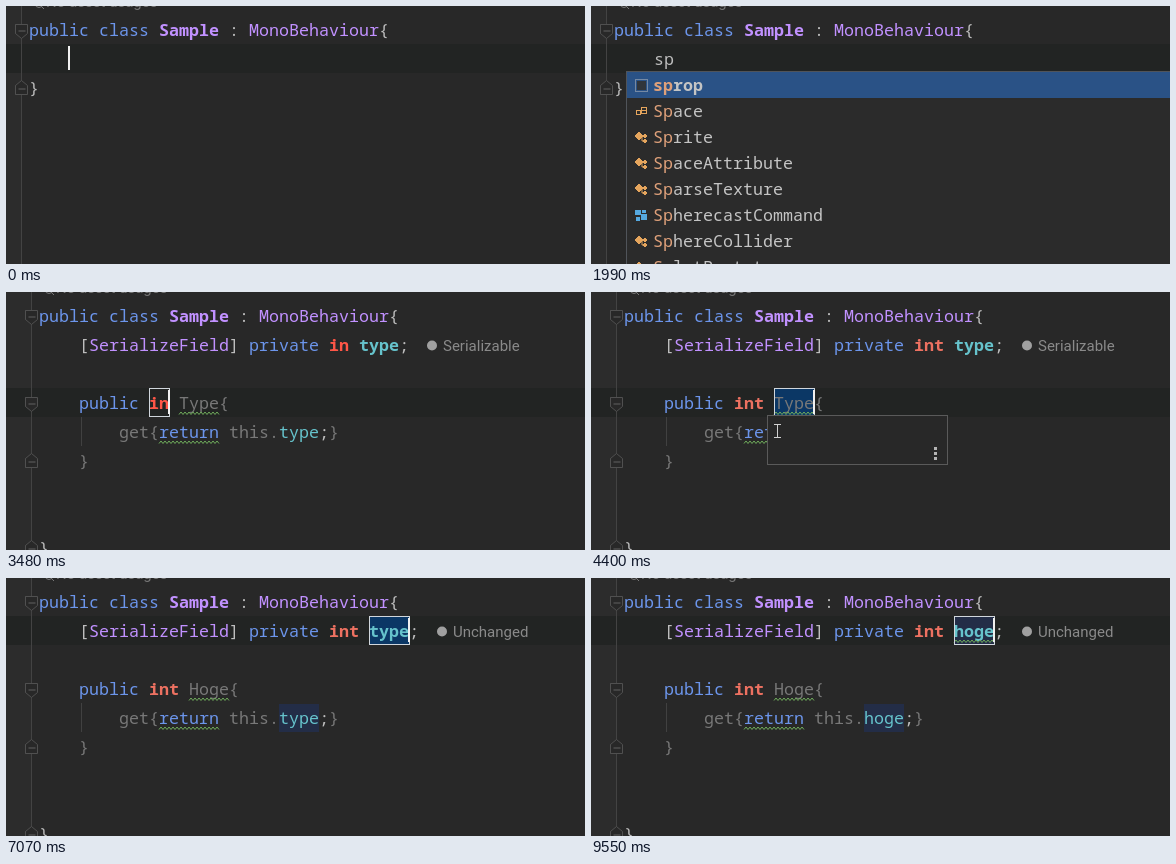
These frames come from a looping animation (579x258 px, 9.76 s). An HTML page with a canvas:

```html
<!DOCTYPE html>
<html lang="en">
<head>
<meta charset="utf-8">
<title>Property template</title>
<style>
html, body { margin: 0; width: 100%; height: 100%; overflow: hidden; background: #282828; }
canvas { display: block; }
</style>
</head>
<body>
<canvas id="stage" width="579" height="258"></canvas>
<script>
const c = document.getElementById('stage').getContext('2d');
const LOOP = 9760, CELL = 10;
const CODE = '16.667px "Noto Sans Mono", monospace';
const UI = '15px Roboto, sans-serif';
const blue = '#6c95eb', purple = '#c191ff', plain = '#bdbdbd', dim = '#787878',
      cyan = '#66c3cc', red = '#ff5647', coral = '#ed7161', green = '#70ad5c';

// Last value whose time has passed: at(t, start, [time, value], ...)
const at = (t, first, ...steps) => steps.reduce((v, [time, next]) => t >= time ? next : v, first);
const mid = row => 24 + 29 * row;
const within = (t, a, b) => t >= a && t < b;

function rect(x, y, w, h, color) {
  c.fillStyle = color;
  c.fillRect(x, y, w, h);
}

function frame(x, y, w, h, color) {
  c.strokeStyle = color;
  c.lineWidth = 1;
  c.strokeRect(x + .5, y + .5, w - 1, h - 1);
}

function path(points, color, fill) {
  c.beginPath();
  points.forEach(([x, y]) => c.lineTo(x, y));
  if (fill) { c.closePath(); c.fillStyle = fill; c.fill(); }
  c.strokeStyle = color;
  c.lineWidth = 1;
  c.stroke();
}

function label(text, x, y, color) {
  c.font = UI;
  c.fillStyle = color;
  c.fillText(text, x, y);
}

// Draws [text, color, bold] runs on the character grid and returns the end
function code(x, baseline, ...runs) {
  for (const [text, color, bold] of runs) {
    c.font = (bold ? 'bold ' : '') + CODE;
    c.fillStyle = color;
    c.fillText(text, x, baseline);
    x += text.length * CELL;
  }
  return x;
}

function squiggle(x, y, w) {
  const points = [];
  for (let i = 0; i <= w; i += 2) points.push([x + i, y + (i % 4 ? -1 : 1.5)]);
  path(points, green);
}

function fold(x, y, dir) {
  path([[x - 6, y - 6 * dir], [x + 6, y - 6 * dir], [x + 6, y + 3 * dir],
        [x, y + 8 * dir], [x - 6, y + 3 * dir]], '#505050', '#282828');
  c.beginPath();
  c.moveTo(x - 6, y - 6 * dir);
  c.lineTo(x - 6, y + 3 * dir);
  c.stroke();
  path([[x - 3, y + .5], [x + 4, y + .5]], '#606060');
}

const caret = (x, row) => rect(x - 1, mid(row) - 13 - (row > 2 ? 0 : 0), 2, 24, '#f0f0f0');

function base(x, row, folds) {
  rect(0, 0, 579, 258, '#282828');
  rect(0, 0, x, 258, '#2c2c2c');
  rect(0, mid(row) - 15, 579, 29, '#222423');
  rect(x, 0, 1, 258, '#434343');
  folds.forEach(([r, dir]) => fold(x + .5, mid(r) + .5, dir));
  c.strokeStyle = dim;
  c.beginPath();
  c.arc(x + 18, -2, 3.5, 0, 7);
  c.moveTo(x + 20, 0);
  c.lineTo(x + 23, 3);
  c.stroke();
  label('No asset usages', x + 25, 1, dim);
  code(x + 8, 30, ['public class ', blue], ['Sample', purple, true],
       [' : ', plain], ['MonoBehaviour', purple], ['{', plain]);
}

function icon(kind, x, y) {
  const tan = '#e5a55d';
  if (kind === 'template') {
    c.setLineDash([1, 1]);
    frame(x - 6, y - 6, 13, 13, '#c0c0c0');
    c.setLineDash([]);
    rect(x - 4, y - 4, 9, 9, '#30353b');
  } else if (kind === 'enum') {
    frame(x - 5, y - 1, 5, 5, tan);
    frame(x, y - 4, 6, 7, tan);
    rect(x + 1, y - 1, 4, 1, tan);
  } else if (kind === 'struct') {
    rect(x - 6, y - 5, 6, 5, '#55a9e0');
    rect(x + 1, y - 5, 4, 3, '#55a9e0');
    rect(x - 5, y + 2, 4, 4, '#55a9e0');
    rect(x, y - 1, 6, 6, '#55a9e0');
  } else {
    const gem = (a, b, r) => path([[a - r, b], [a, b - r], [a + r, b], [a, b + r]], tan, tan);
    path([[x - 2, y], [x + 1, y], [x + 1, y + 4], [x + 4, y + 4]], tan);
    gem(x - 2, y - 1, 4);
    gem(x + 4, y - 1, 2);
    gem(x + 4, y + 4, 2);
  }
}

const choices = [['sprop', 'template'], ['Space', 'enum'], ['Sprite'], ['SpaceAttribute'],
  ['SparseTexture'], ['SpherecastCommand', 'struct'], ['SphereCollider'], ['SplatPrototype']];

function completion(typed) {
  rect(35, 65, 544, 193, '#2b2b2b');
  rect(35, 65, 544, 1, '#50545a');
  rect(35, 65, 1, 193, '#50545a');
  rect(36, 66, 543, 26, '#2a5286');
  choices.forEach(([name, kind], i) => {
    const y = 79 + 26 * i, bold = i === 0;
    icon(kind, 50, y);
    code(62, y + 6, [name.slice(0, typed), '#dea07a', bold], [name.slice(typed), '#c4c4c4', bold]);
  });
}

function before(t) {
  const typed = at(t, '', [930, 's'], [1100, 'sp'], [2180, 'sprop']);
  base(15, 1, [[0, 1], [2, -1]]);
  code(23, 88, ['}', plain]);
  const end = code(63, 59, [typed, plain]);
  if (within(t, 1020, 2180)) completion(typed.length);
  if (!within(t, 430, 930) && !within(t, 1990, 2110)) caret(end, 1);
}

function hint(t, x) {
  if (t < 2810 || within(t, 9460, 9550)) return;
  c.fillStyle = '#a0a0a0';
  c.beginPath();
  c.arc(x + 23, 53.5, 5, 0, 7);
  c.fill();
  label(t < 6260 ? 'Serializable' : 'Unchanged', x + 34, 59, '#8a8a8a');
}

function slot(x, row, length, selected) {
  const y = mid(row) - 15, w = length * CELL;
  if (selected) rect(x, y, w, 28, '#0b3765');
  return () => frame(x, y, w + 1, 29, '#d0d6dc');
}

function after(t) {
  const type = at(t, 'type', [3350, 'i'], [3480, 'in'], [3660, 'int']);
  const prop = at(t, 'Type', [5440, 'H'], [5580, 'Ho'], [5830, 'Hog'], [6010, 'Hoge']);
  const field = at(t, 'type', [7380, 'h'], [7470, 'ho'], [7570, 'hog'], [7690, 'hoge']);
  const row = t < 6950 ? 3 : 1;
  const typeX = 143, propX = typeX + (type.length + 1) * CELL;
  const fieldX = 323 + (type.length + 1) * CELL;
  const typeColor = type === 'int' ? coral : red;

  base(25, row, [[0, 1], [3, 1], [5, -1], [8, -1]]);
  rect(75, 125, 1, 29, '#414141');

  let border = null, caretX;
  if (t < 4400) {
    border = slot(typeX, 3, type.length, t < 3350);
    caretX = typeX + type.length * CELL;
  } else if (t < 6820) {
    border = slot(propX, 3, prop.length, t < 5440);
    caretX = propX + prop.length * CELL;
  } else {
    border = slot(fieldX, 1, field.length, t < 7380);
    caretX = fieldX + field.length * CELL;
    if (t >= 7070) {
      if (t >= 7760) rect(fieldX, 39, field.length * CELL, 28, '#232d47');
      rect(273, 126, field.length * CELL, 28, '#232d47');
    }
  }

  const end = code(73, 59, ['[', plain], ['SerializeField', purple], ['] ', plain],
    ['private ', blue], [type, typeColor, true], [' ', plain], [field, cyan, true], [';', plain]);
  hint(t, end);

  const fresh = within(t, 5580, 5760) ? 1 : prop.length;
  code(73, 117, ['public ', blue], [type, typeColor, true], [' ', plain],
    [prop.slice(0, fresh), dim], [prop.slice(fresh), plain], ['{', dim]);
  squiggle(propX, 121, fresh * CELL);
  code(113, 146, ['get{', dim], ['return', blue], [' this.', dim], [field, cyan], [';', plain], ['}', dim]);
  squiggle(153, 150, 60);
  code(73, 175, ['}', dim]);
  code(33, 262, ['}', plain]);

  if (t >= 8750) squiggle(fieldX, 63, field.length * CELL);
  border();
  if (within(t, 4400, 5440)) tooltip();
  const hidden = within(t, 2990, 3350) || within(t, 4960, 5440) || within(t, 8450, 9010);
  if (!hidden) caret(caretX, t < 6820 ? 3 : 1);
}

function tooltip() {
  rect(176, 123, 181, 50, '#282828');
  frame(176, 123, 181, 50, '#5a5a5a');
  rect(186, 133, 1, 12, '#d0d0d0');
  rect(183, 132, 7, 1, '#d0d0d0');
  rect(183, 145, 7, 1, '#d0d0d0');
  [155, 160, 165].forEach(y => rect(343, y, 3, 3, '#b4b4b4'));
}

const start = performance.now();
function draw() {
  const t = (performance.now() - start) % LOOP;
  (t < 2260 ? before : after)(t);
  requestAnimationFrame(draw);
}
draw();
</script>
</body>
</html>
```
